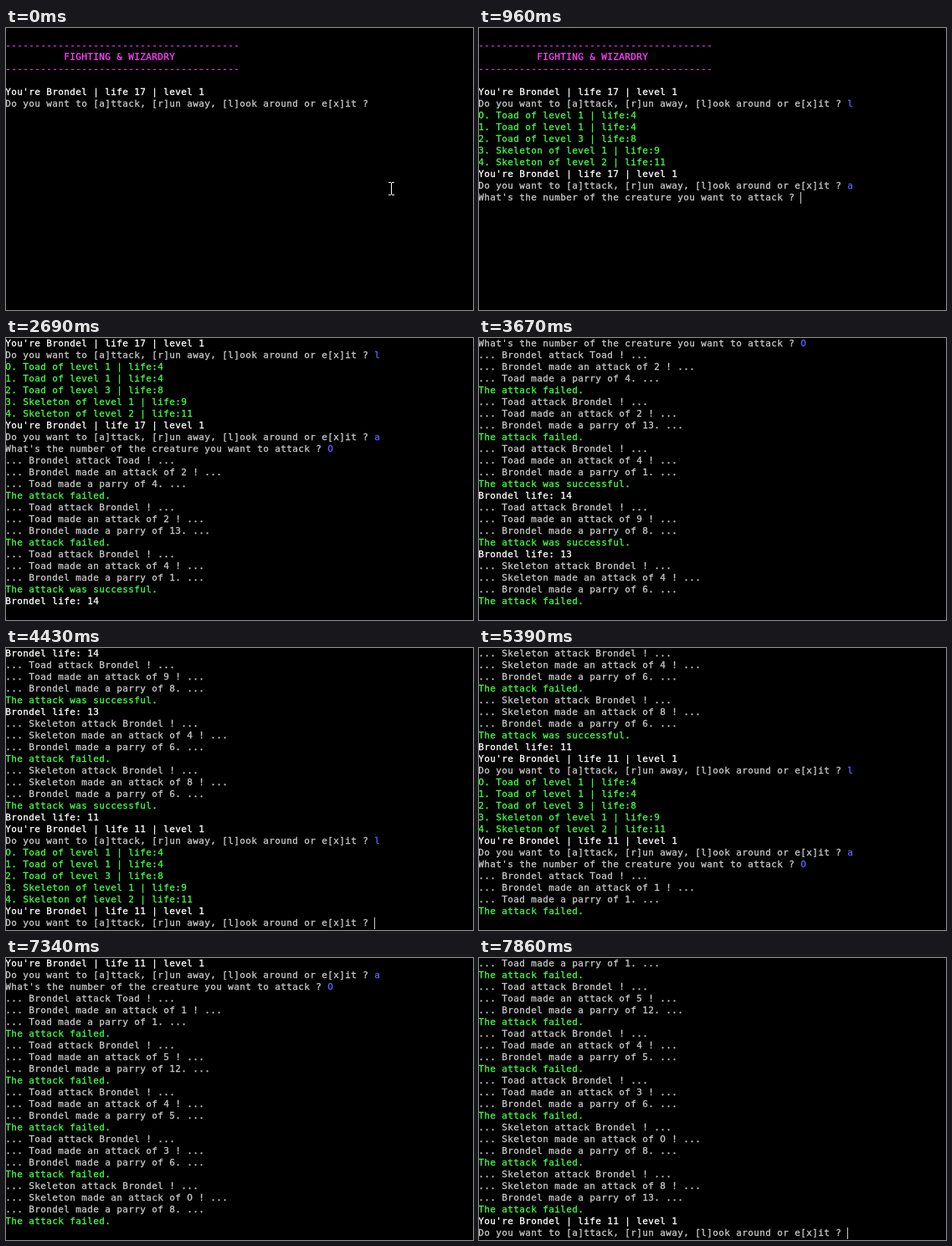
An HTML page for the animation above (8 s loop, 558x337 px).

```html
<!DOCTYPE html>
<html lang="en">
<head>
<meta charset="utf-8">
<title>Fighting &amp; Wizardry</title>
<style>
  html, body { margin: 0; width: 100%; height: 100%; overflow: hidden; background: #000; }
  #stage { position: relative; width: 558px; height: 337px; overflow: hidden; background: #000; }
  #screen {
    position: absolute; left: -0.8px; top: 0;
    font: 11px/13px "DejaVu Sans Mono", monospace;
    letter-spacing: calc(7px - 1ch); /* terminal grid of 7px cells */
    font-variant-ligatures: none;
    -webkit-text-stroke: 0.3px currentColor;
  }
  #screen div { height: 14px; white-space: pre; }
  #cursor { position: absolute; width: 1px; height: 14px; background: #c8c8c8; }
  #mouse { position: absolute; left: 457px; top: 184px; }
</style>
</head>
<body>
<div id="stage">
  <div id="screen"></div>
  <div id="cursor"></div>
  <svg id="mouse" width="7" height="16" shape-rendering="crispEdges">
    <path fill="#fff" d="M0 0h3v1h-3z M4 0h3v1h-3z M3 1h1v14h-1z M0 15h3v1h-3z M4 15h3v1h-3z"/>
  </svg>
</div>
<script>
const LOOP = 8000, BEAT = 490, BLINK = 240;
const ROWS = 24, CELL = 7, ROW_H = 14;
const WHITE = '#fff', GREY = '#c8c8c8', GREEN = '#40ff40', PINK = '#ff40ff', BLUE = '#6060ff';
const HERO = 'Brondel';

// The session is played once into a log; each line keeps the time it is printed
const log = [];
let clock = -BLINK;

function print(color, text, key, keyAt) {
  log.push({ at: clock, color, text, key, keyAt });
}

// A question waits for a key; the session goes on when it is entered
function ask(text, key, keyAt, enterAt) {
  print(GREY, text, key, keyAt);
  clock = enterAt;
}

function turn(life, key, keyAt, enterAt) {
  print(WHITE, `You're ${HERO} | life ${life} | level 1`);
  ask('Do you want to [a]ttack, [r]un away, [l]ook around or e[x]it ? ', key, keyAt, enterAt);
}

function look() {
  const seen = [
    'Toad of level 1 | life:4',
    'Toad of level 1 | life:4',
    'Toad of level 3 | life:8',
    'Skeleton of level 1 | life:9',
    'Skeleton of level 2 | life:11'
  ];
  seen.forEach((creature, i) => print(GREEN, `${i}. ${creature}`));
}

function pick(keyAt, enterAt) {
  ask("What's the number of the creature you want to attack ? ", '0', keyAt, enterAt);
}

function fight(from, to, hit, parry, lifeLeft) {
  print(GREY, `... ${from} attack ${to} ! ...`);
  print(GREY, `... ${from} made an attack of ${hit} ! ...`);
  print(GREY, `... ${to} made a parry of ${parry}. ...`);
  print(GREEN, lifeLeft ? 'The attack was successful.' : 'The attack failed.');
  if (lifeLeft) print(WHITE, `${HERO} life: ${lifeLeft}`);
  clock += BEAT;
}

function title() {
  const rule = '-'.repeat(40);
  print(GREY, '');
  print(PINK, rule);
  print(PINK, ' '.repeat(10) + 'FIGHTING & WIZARDRY');
  print(PINK, rule);
  print(GREY, '');
}

title();
turn(17, 'l', 170, 340);
look();
turn(17, 'a', 680, 960);
pick(1270, 1700);
fight(HERO, 'Toad', 2, 4);
fight('Toad', HERO, 2, 13);
fight('Toad', HERO, 4, 1, 14);
fight('Toad', HERO, 9, 8, 13);
fight('Skeleton', HERO, 4, 6);
clock -= BEAT - BEAT;
fight('Skeleton', HERO, 8, 6, 11);
clock -= BEAT;
turn(11, 'l', 4430, 4430);
look();
turn(11, 'a', 4700, 4910);
pick(5180, 5380);
fight(HERO, 'Toad', 1, 1);
fight('Toad', HERO, 5, 12);
fight('Toad', HERO, 4, 5);
fight('Toad', HERO, 3, 6);
fight('Skeleton', HERO, 0, 8);
fight('Skeleton', HERO, 8, 13);
clock -= BEAT; // the next turn follows the last blow at once
turn(11, '', LOOP, LOOP);

const byId = id => document.getElementById(id);
const cursor = byId('cursor'), mouse = byId('mouse');
const firstKey = log.find(line => line.key).keyAt;

const rows = Array.from({ length: ROWS }, () => {
  const row = byId('screen').appendChild(document.createElement('div'));
  return ['span', 'span'].map(tag => row.appendChild(document.createElement(tag)));
});

// Zeros are shown as a plain ring without a dot
function setText(span, text, color) {
  span.textContent = text.replace(/0/g, 'O');
  span.style.color = color;
}

const show = (el, on) => el.style.display = on ? 'block' : 'none';

function draw(t) {
  const lines = log.filter(line => line.at <= t);
  const last = lines.at(-1);
  const asking = last.key !== undefined;
  const top = Math.max(0, lines.length - (asking ? ROWS : ROWS - 1));

  rows.forEach(([text, input], r) => {
    const line = lines[top + r] || { color: GREY, text: '' };
    setText(text, line.text, line.color);
    setText(input, line.keyAt <= t ? line.key : '', BLUE);
  });

  const typed = last.keyAt <= t;
  const column = last.text.length + (typed ? 1 : 0);
  cursor.style.left = column * CELL - 1 + 'px';
  cursor.style.top = (lines.length - 1 - top) * ROW_H + 'px';
  show(cursor, asking && t - (typed ? last.keyAt : last.at) < BLINK);
  show(mouse, t < firstKey);
}

const start = performance.now();
function tick() {
  draw((performance.now() - start) % LOOP);
  requestAnimationFrame(tick);
}
tick();
</script>
</body>
</html>
```
